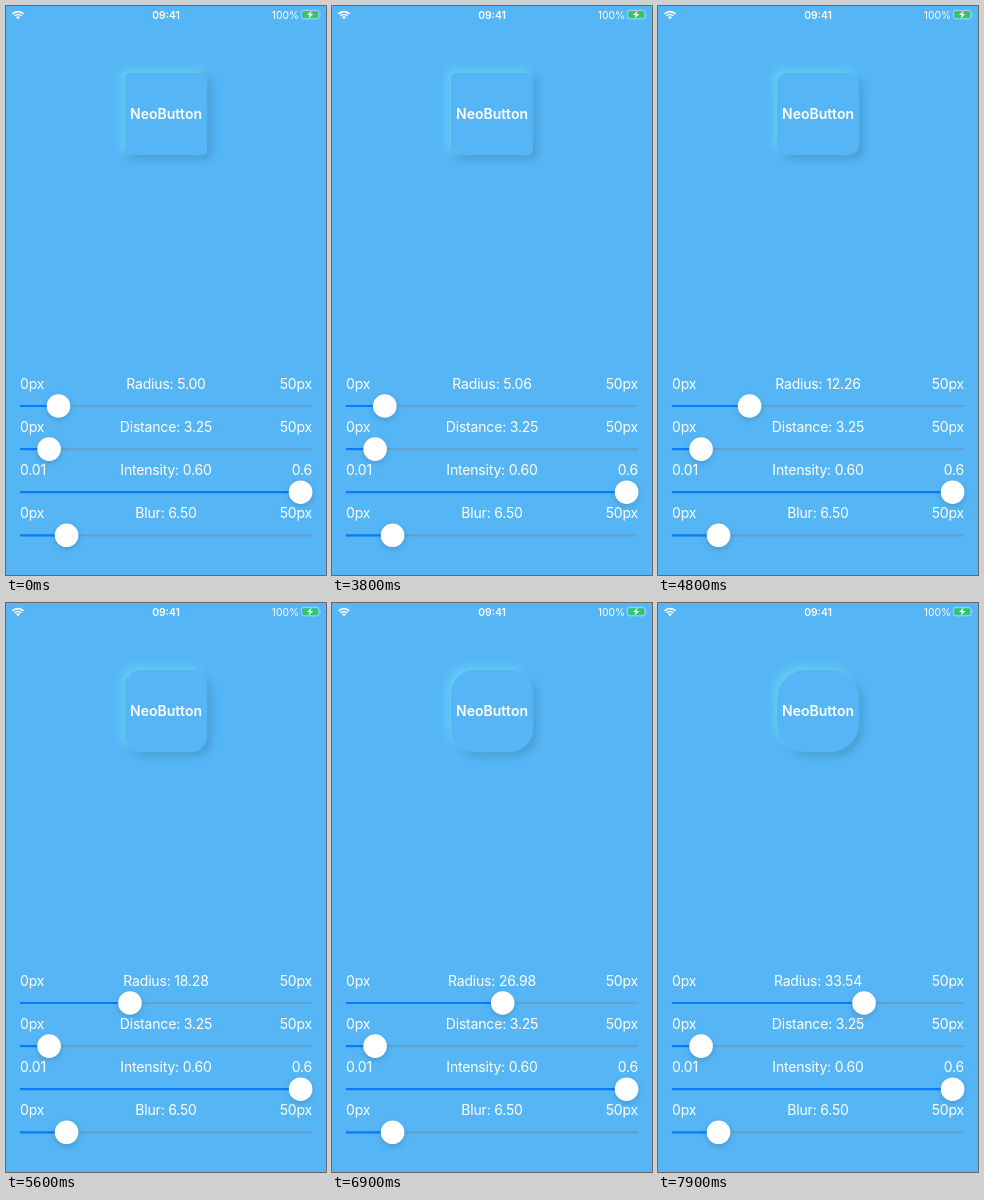
Recreate the animation shown at these times as an HTML page. Size 320 px wide and 569 px high, loop 8000 ms.

```html
<!DOCTYPE html>
<html lang="en">
<head>
<meta charset="utf-8">
<title>Button playground</title>
<style>
  html, body { margin: 0; width: 100%; height: 100%; overflow: hidden; background: #56b6f5; }
  #stage { position: relative; width: 320px; height: 569px; overflow: hidden; background: #56b6f5; }
  #button {
    position: absolute; left: 119px; top: 66.5px; width: 82px; height: 82px;
    background: #56b6f5; color: #fff; text-align: center;
    font: 600 14px/82px Inter, sans-serif;
  }
  svg { position: absolute; left: 0; top: 0; }
  text { fill: #fff; font: 14px Inter, sans-serif; letter-spacing: -.18px; }
  .status text { font-size: 10.3px; letter-spacing: 0; }
  .status .clock { font-weight: 600; }
  .mid { text-anchor: middle; }
  .end { text-anchor: end; }
  .thumb { fill: #fff; filter: drop-shadow(0 2.5px 3px rgba(0, 0, 0, .17)); }
</style>
</head>
<body>
<div id="stage">
  <div id="button">NeoButton</div>
  <svg width="320" height="569" viewBox="0 0 320 569">
    <g class="status">
      <g fill="none" stroke="#fff">
        <path d="M6.6 7.8a7.6 7.6 0 0 1 10.8 0" stroke-width="1.8"/>
        <path d="M8.6 9.9a4.8 4.8 0 0 1 6.8 0" stroke-width="1.6"/>
      </g>
      <path d="M12 13.3l-2-2a2.8 2.8 0 0 1 4 0z" fill="#fff"/>
      <text class="mid clock" x="160" y="12.6">09:41</text>
      <text class="end" x="293" y="12.6">100%</text>
      <rect x="295.4" y="4.3" width="17.6" height="8.6" rx="2.2" fill="none" stroke="#fff" stroke-opacity=".55" stroke-width=".8"/>
      <rect x="296.5" y="5.4" width="15.4" height="6.4" rx="1.3" fill="#35c759"/>
      <path d="M314 7.2q1.2 1.4 0 2.8z" fill="#fff" opacity=".6"/>
      <path d="M305.6 4.8l-4.6 4.3h2.7l-1.1 3.3 4.7-4.4h-2.8z" fill="#fff"/>
    </g>
    <g id="sliders"></g>
  </svg>
</div>
<script>
const LOOP = 8000, STEP = 100;

// Shadow scale held from each time on (1 = raised)
const press = [[0, 1], [700, .5], [800, .4], [1100, .75], [1200, 1],
  [1800, .5], [1900, .4], [2200, .6], [2300, .8], [2400, .93], [2500, 1]];

// Radius while the first slider is dragged
const drag = [[4000, 5.06], [4800, 12.26], [5600, 18.28], [6900, 26.98], [7900, 33.54]];

const button = document.getElementById('button');

function addSlider(i, name, value, min, max, low, high) {
  const y = 400 + 43.1 * i;
  const row = document.createElementNS('http://www.w3.org/2000/svg', 'g');
  row.innerHTML = `
    <text x="14" y="${y - 17}">${low}</text>
    <text class="mid" x="160" y="${y - 17}"></text>
    <text class="end" x="306" y="${y - 17}">${high}</text>
    <path d="M14 ${y}H306" stroke="#60a2d0" stroke-width="2.2"/>
    <path stroke="#087cff" stroke-width="2.2"/>
    <circle class="thumb" cy="${y}" r="11.8"/>`;
  document.getElementById('sliders').append(row);
  const label = row.querySelector('.mid');
  const fill = row.querySelectorAll('path')[1];
  const thumb = row.querySelector('circle');
  const set = v => {
    const x = 25.6 + 269 * (v - min) / (max - min);
    label.textContent = `${name}: ${v.toFixed(2)}`;
    fill.setAttribute('d', `M14 ${y}H${x}`);
    thumb.setAttribute('cx', x);
  };
  set(value);
  return set;
}

const setRadius = addSlider(0, 'Radius', 5, 0, 50, '0px', '50px');
addSlider(1, 'Distance', 3.25, 0, 50, '0px', '50px');
addSlider(2, 'Intensity', .6, .01, .6, '0.01', '0.6');
addSlider(3, 'Blur', 6.5, 0, 50, '0px', '50px');

function radiusAt(t) {
  if (t < 3800) return 5;
  if (t <= drag[0][0]) return drag[0][1];
  const i = drag.findIndex(p => p[0] >= t);
  const [t0, r0] = drag[i - 1], [t1, r1] = drag[i];
  return r0 + (r1 - r0) * (t - t0) / (t1 - t0);
}

function draw() {
  const t = Math.floor(performance.now() % LOOP / STEP) * STEP;
  const k = press.filter(p => p[0] <= t).pop()[1];
  const radius = radiusAt(t);
  const d = 3.6 * k, blur = 9 * k;
  setRadius(radius);
  button.style.borderRadius = radius * .853 + 'px';
  button.style.boxShadow =
    `${-d}px ${-d}px ${blur}px #64d0f4, ${d}px ${d}px ${blur}px #4798cd`;
  requestAnimationFrame(draw);
}
draw();
</script>
</body>
</html>
```
